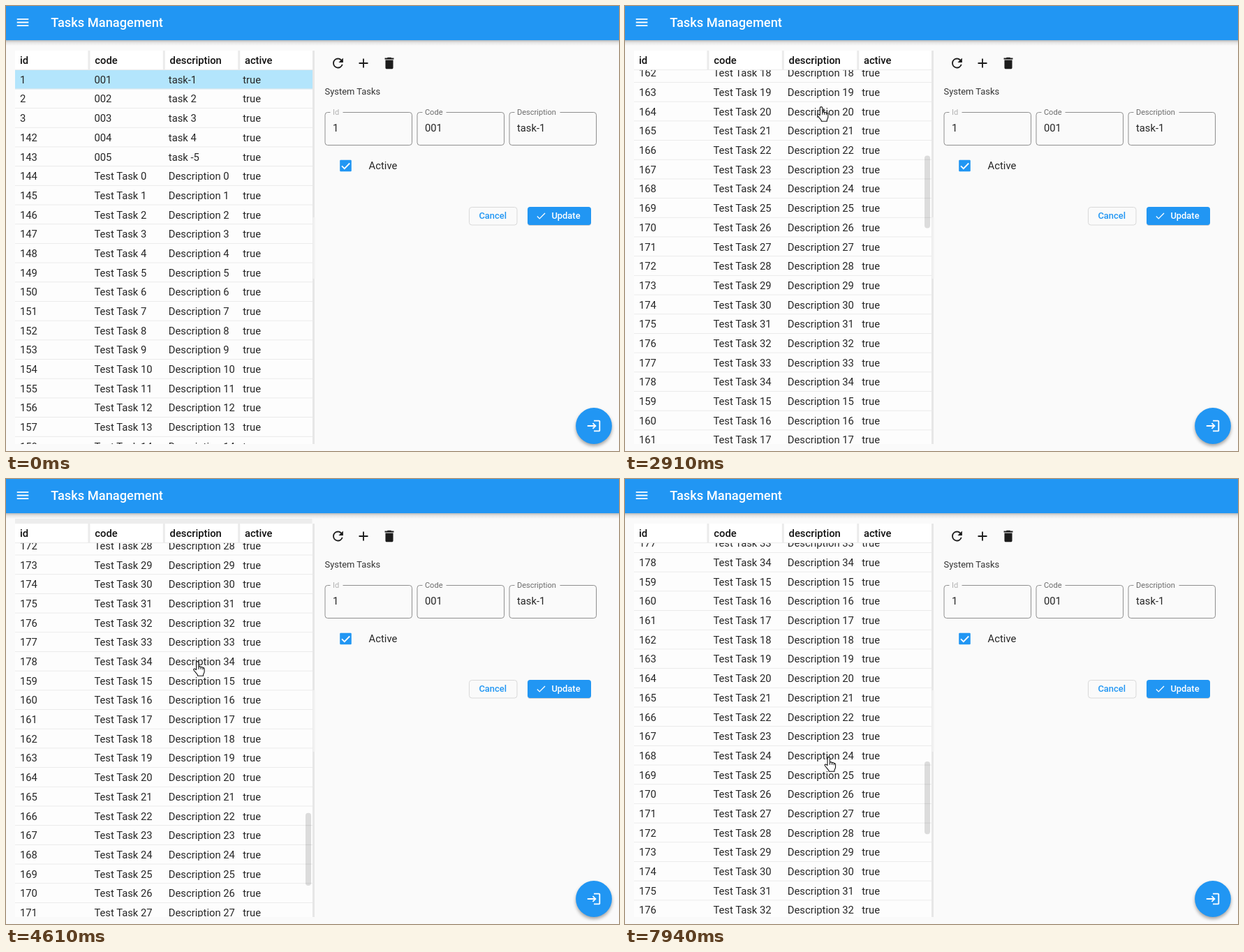
Animation, 878 px wide and 638 px high, one loop 8000 ms. Source, as an HTML page:

```html
<!DOCTYPE html>
<html lang="en">
<head>
<meta charset="utf-8">
<title>Tasks Management</title>
<style>
  html, body { margin: 0; width: 100%; height: 100%; overflow: hidden; background: #fafafa; }
  svg { display: block; font-family: Roboto, "Liberation Sans", sans-serif; }
  text { white-space: pre; }
</style>
</head>
<body>
<svg id="stage" width="878" height="638" viewBox="0 0 878 638">
  <defs>
    <clipPath id="view"><rect x="13" y="91.5" width="426" height="536.5"/></clipPath>
    <linearGradient id="shade" x1="0" y1="0" x2="0" y2="1">
      <stop offset="0" stop-color="#000" stop-opacity=".26"/>
      <stop offset=".4" stop-color="#000" stop-opacity=".09"/>
      <stop offset="1" stop-color="#000" stop-opacity="0"/>
    </linearGradient>
    <filter id="blur" x="-30%" y="-30%" width="160%" height="160%"><feGaussianBlur stdDeviation="2.6"/></filter>
  </defs>
  <g id="ui"></g>
</svg>
<script>
const NS = 'http://www.w3.org/2000/svg';
const LOOP = 8000, ROW = 27.69, TOP = 91.65, BOTTOM = 628, NOTCH = 92.33, END = 24.54;
const BLUE = '#2196f3', INK = '#262626';
const ui = document.getElementById('ui');

function add(tag, attrs, parent = ui) {
  const el = document.createElementNS(NS, tag);
  for (const k in attrs) el.setAttribute(k, attrs[k]);
  parent.appendChild(el);
  return el;
}
const rect = (x, y, width, height, fill, parent, more) =>
  add('rect', { x, y, width, height, fill, ...more }, parent);
function label(str, x, y, size, fill, parent, weight = 400) {
  const el = add('text', { x, y, 'font-size': size, fill, 'font-weight': weight }, parent);
  el.textContent = str;
  return el;
}

const icons = {
  menu: 'M3 18h18v-2H3v2zm0-5h18v-2H3v2zm0-7v2h18V6H3z',
  refresh: 'M17.65 6.35A7.96 7.96 0 0 0 12 4a8 8 0 1 0 7.73 10h-2.08A6 6 0 1 1 12 6c1.66 0 3.14.69 4.22 1.78L13 11h7V4z',
  plus: 'M19 13h-6v6h-2v-6H5v-2h6V5h2v6h6z',
  trash: 'M6 19c0 1.1.9 2 2 2h8c1.1 0 2-.9 2-2V7H6zM19 4h-3.5l-1-1h-5l-1 1H5v2h14z',
  check: 'M9 16.17L4.83 12l-1.42 1.41L9 19 21 7l-1.41-1.41z',
  login: 'M11 7L9.6 8.4l2.6 2.6H2v2h10.2l-2.6 2.6L11 17l5-5zm9 12h-8v2h8c1.1 0 2-.9 2-2V5c0-1.1-.9-2-2-2h-8v2h8z'
};
const icon = (name, cx, cy, fill, scale = .923, parent = ui) =>
  add('path', { d: icons[name], fill, transform: `translate(${cx} ${cy}) scale(${scale}) translate(-12 -12)` }, parent);

// Table rows: 40 entries, then the last 20 repeated three times
const rows = [[1, '001', 'task-1'], [2, '002', 'task 2'], [3, '003', 'task 3'],
  [142, '004', 'task 4'], [143, '005', 'task -5']];
const addTask = n => rows.push([144 + n, 'Test Task ' + n, 'Description ' + n]);
for (let n = 0; n < 35; n++) addTask(n);
for (let k = 0; k < 60; k++) addTask(15 + k % 20);

rect(0, 0, 878, 638, '#fafafa');
const strip = rect(13, 57, 425.5, 7, '#ededed');
rect(13, 64, 426, 564, '#fdfdfd');

const clip = add('g', { 'clip-path': 'url(#view)' });
const list = add('g', {}, clip);
rows.forEach((cells, i) => {
  const y = TOP + i * ROW;
  if (i === 0) rect(13, y, 426, ROW, '#b3e5fc', list);
  rect(13, y + ROW - .9, 426, .9, '#e9e9e9', list);
  [...cells, 'true'].forEach((c, j) => label(c, 20 + j * 106.4, y + 19.1, 14.77, INK, list));
});

const footer = add('g', {}, clip);
rect(13, 594.6, 426, 60, '#fafafa', footer);
icon('refresh', 166, 615, BLUE, .69, footer);
label('Check for new Data', 180.6, 619.6, 12.92, BLUE, footer, 500);
const thumb = rect(429, 91, 8, 103, '#000', clip, { rx: 3.7 });

rect(13, 64, 426, 27.2, '#fff');
rect(13, 91, 426, .8, '#e6e6e6');
['id', 'code', 'description', 'active'].forEach((h, i) => {
  label(h, 20 + i * 107.3, 83.2, 14.77, '#111', ui, 500);
  if (i) rect(10 + i * 107.4, 64, 3, 27, '#ebebeb');
});
rect(439, 64, 3, 564, '#e7e7e7');
rect(439.5, 303, 3, 88, '#f1f1f1');

// App bar
rect(0, 49, 878, 8, 'url(#shade)');
rect(0, 0, 878, 49, BLUE);
icon('menu', 24, 23.5, '#fff');
label('Tasks Management', 64.3, 30.4, 18.3, '#fff', ui, 500);

// Form
icon('refresh', 475.5, 82, '#1c1c1c');
icon('plus', 512, 82, '#1c1c1c');
icon('trash', 549, 82, '#1c1c1c');
label('System Tasks', 456.6, 127.2, 12.92, '#333');
[['Id', '1', 14], ['Code', '001', 30], ['Description', 'task-1', 61]].forEach(([name, value, gap], i) => {
  const x = 457 + i * 132;
  rect(x, 152.5, 124.5, 47, 'none', ui, { rx: 3.7, stroke: '#8f8f8f', 'stroke-width': 1 });
  rect(x + 7.5, 151, gap + 4, 3, '#fafafa');
  label(name, x + 10.9, 156.4, 11.07, i ? '#6c6c6c' : '#b3b3b3');
  label(value, x + 11, 180.2, 14.77, INK);
});
rect(478.2, 220.7, 16.6, 16.6, BLUE, ui, { rx: 1.2 });
add('path', { d: 'M481 229.3l3.8 3.8 7.4-7.6', fill: 'none', stroke: '#fff', 'stroke-width': 1.8 });
label('Active', 519.6, 234.4, 14.77, INK);

rect(663.5, 288.5, 68.5, 25.5, 'none', ui, { rx: 3.7, stroke: '#d9d9d9', 'stroke-width': 1 });
label('Cancel', 677.4, 305.4, 12.92, BLUE, ui, 500);
rect(747, 289.5, 91, 25.5, '#000', ui, { rx: 3.7, opacity: .18 });
rect(747, 288, 91, 26, BLUE, ui, { rx: 3.7 });
icon('check', 766.3, 301, '#fff', .69);
label('Update', 781.4, 305.4, 12.92, '#fff', ui, 500);

add('circle', { cx: 842, cy: 605, r: 25.8, fill: '#000', opacity: .36, filter: 'url(#blur)' });
add('circle', { cx: 842, cy: 602, r: 25.9, fill: BLUE });
icon('login', 842, 602, '#fff');

const pointer = { fill: '#fff', stroke: '#111', 'stroke-width': 1.1, 'stroke-linejoin': 'round' };
const hand = add('path', { ...pointer,
  d: 'M5 12.5V2.3a1.7 1.7 0 0 1 3.4 0V8.5c.4-1 3-.9 3.1.4.6-.8 2.8-.5 2.8.9.8-.5 2.2 0 2.2 1.5v4c0 2-1.6 3-1.6 5v1H7v-1.1C6 18 3 15.5 1.2 12.8c-.6-1.3 1-2.4 2.2-1.2zM8.4 8.5v3.2M11.5 9v2.8M14.3 9.8v2.4' });
const arrow = add('path', { ...pointer, d: 'M1 1v15.5l3.6-3.4 2.4 5.6 2.6-1.1-2.4-5.4h5z' });

// [time, wheel notches scrolled]
const wheel = [[0, 0], [1890, 1], [2030, 2], [2230, 3], [2370, 4], [2840, 5], [2910, 7], [2980, 8],
  [3310, 10], [3380, 11]];
for (let k = 0; k < 10; k++) wheel.push([3710 + k * 70, 12 + k]);
wheel.push([4610, 22], [4680, 23], [4750, 24], [4820, 24.18], [4900, 24.36], [4970, END],
  [6980, END - 1], [7260, END - 2], [7330, END - 3], [7400, END - 4], [7470, END - 5],
  [7870, END - 6], [7940, END - 7]);
// [time, x, y]
const path = [[180, 627, 494], [320, 480, 350], [460, 310, 215], [540, 269, 178], [600, 271, 189],
  [800, 276, 185], [960, 291, 168], [1080, 288, 152], [1210, 274.3, 144], [3710, 274.3, 144],
  [4410, 267.6, 261], [6510, 267.6, 261], [6710, 285, 398], [8000, 285, 398]];
const thumbFade = [[1890, .25], [2090, 1], [5440, 1], [5580, 0], [6980, .3], [7190, 1]];

const held = (table, t) => table.reduce((v, s) => t >= s[0] ? s[1] : v, 0);
function tween(table, t, col) {
  const i = table.findIndex(s => s[0] > t);
  if (i < 0) return table[table.length - 1][col];
  if (i === 0) return table[0][col];
  const a = table[i - 1], b = table[i];
  return a[col] + (b[col] - a[col]) * (t - a[0]) / (b[0] - a[0]);
}
const show = (el, on) => el.setAttribute('visibility', on ? 'visible' : 'hidden');
const move = (el, x, y) => el.setAttribute('transform', `translate(${x} ${y})`);

function draw(t) {
  const scroll = held(wheel, t) * NOTCH;
  move(list, 0, -scroll);

  const open = held([[4900, .5], [4970, 1], [6980, 0]], t);
  move(footer, 0, 33.4 * (1 - open));
  show(footer, open > 0);

  const view = BOTTOM - 91 - 33 * open;
  const size = view * view / 2769;
  const range = t < 4820 ? 2267 : 2769 - view;
  thumb.setAttribute('height', size);
  thumb.setAttribute('y', 91 + Math.min(1, scroll / range) * (view - size));
  thumb.setAttribute('opacity', t < 1890 || (t >= 5580 && t < 6980) ? 0 : .13 * tween(thumbFade, t, 1));

  show(strip, (t >= 1890 && t < 2840) || (t >= 4610 && t < 4970));

  const x = tween(path, t, 1), y = tween(path, t, 2), over = x < 436;
  show(hand, t >= 180 && over);
  show(arrow, t >= 180 && !over);
  move(hand, x, y);
  move(arrow, x, y);
}

const start = performance.now();
function tick() {
  draw((performance.now() - start) % LOOP);
  requestAnimationFrame(tick);
}
draw(0);
requestAnimationFrame(tick);
</script>
</body>
</html>
```
